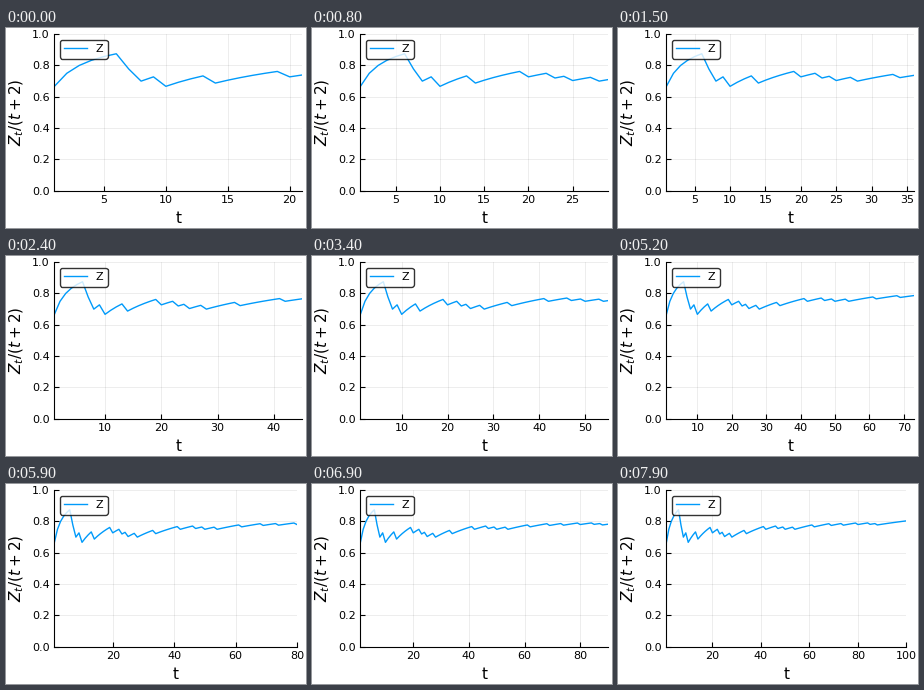
These frames come from a looping animation (300 px wide and 200 px high, 8 s). A matplotlib script:

```python
import numpy as np
import matplotlib.pyplot as plt
from matplotlib.animation import FuncAnimation

WIDTH, HEIGHT, DPI = 300, 200, 100
LEFT, TOP, BOTTOM = 48.4, 6.2, 162.6     # axes edges in pixels from the top left
MARGIN = 3.94
FIRST, LAST = 21, 100

plt.rcParams.update({"font.family": "DejaVu Sans", "mathtext.fontset": "dejavusans"})

# Urn process: Z grows by one at every step except these.
MISSES = [7, 8, 10, 14, 20, 23, 25, 28, 34, 42, 47, 50, 54, 62, 69, 74, 80, 85, 88]
t = np.arange(1, LAST + 1)
share = (1 + np.cumsum(~np.isin(t, MISSES))) / (t + 2)

fig = plt.figure(figsize=(WIDTH / DPI, HEIGHT / DPI), dpi=DPI, facecolor="white")
ax = fig.add_axes([0.1, 0.1, 0.8, 0.8])
line, = ax.plot([], [], color="#009AFA", lw=1, label="Z")
ax.set_ylim(0, 1)
ax.set_yticks(np.linspace(0, 1, 6))
ax.set_xlabel("t", fontsize=11)
ax.set_ylabel("$Z_t/(t+2)$", fontsize=11)
ax.tick_params(direction="in", labelsize=8)
ax.spines[["top", "right"]].set_visible(False)
ax.set_axisbelow(True)
ax.grid(color="black", lw=0.5, alpha=0.1)
legend = ax.legend(loc="upper left", fontsize=8, framealpha=0.8, edgecolor="black")
legend.get_frame().set_linewidth(1)


def tick_step(n):
    return 5 if n < 40 else 10 if n < 80 else 20


def right_edge(n, last_tick):
    """Leave room for the last tick label when it sits near the end of the axis."""
    half_label = 2.545 * len(str(last_tick))
    gap = (n - last_tick) / (n - 1) * 0.775 * WIDTH
    return WIDTH - MARGIN - max(0, half_label - gap)


def update(frame):
    n = FIRST + frame
    step = tick_step(n)
    ticks = range(step, n + 1, step)
    right = right_edge(n, ticks[-1])
    ax.set_position([LEFT / WIDTH, 1 - BOTTOM / HEIGHT,
                     (right - LEFT) / WIDTH, (BOTTOM - TOP) / HEIGHT])
    ax.set_xlim(1, n)
    ax.set_xticks(ticks)
    line.set_data(t[:n], share[:n])
    return line,


anim = FuncAnimation(fig, update, frames=LAST - FIRST + 1, interval=100,
                     repeat=True, repeat_delay=0, blit=False)
plt.show()
```
